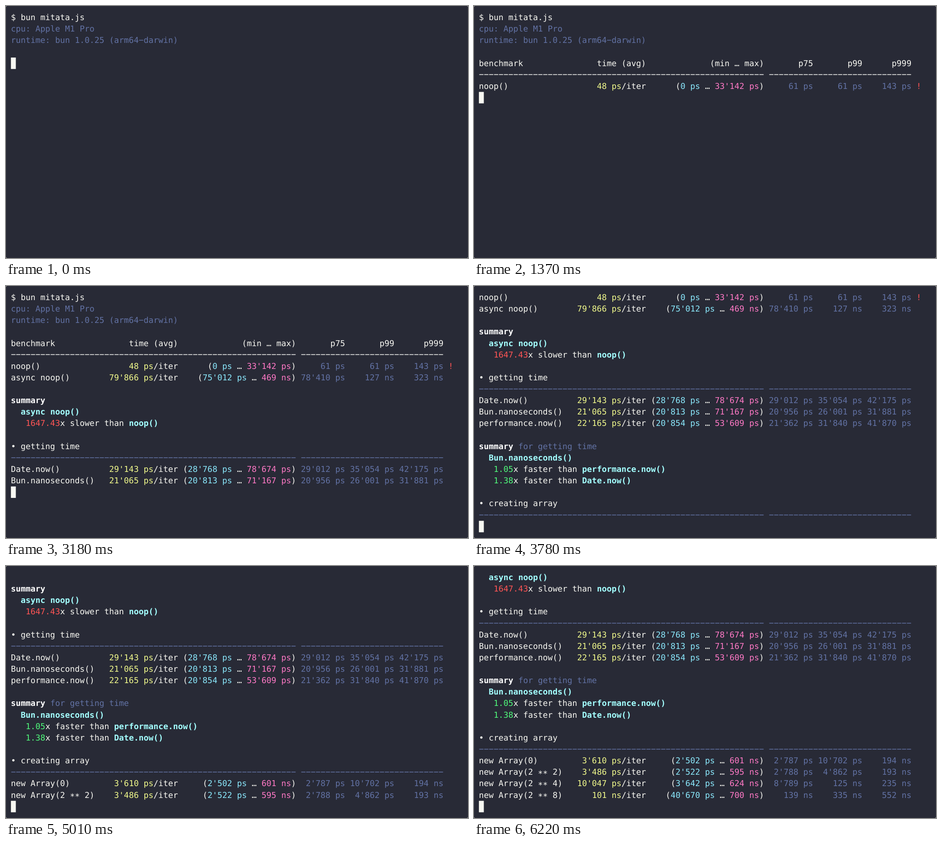
Write an HTML page that moves like this. It is 1012 px wide and 553 px high and loops after 8000 ms.

```html
<!DOCTYPE html>
<html lang="en">
<head>
<meta charset="utf-8">
<title>Benchmark run</title>
<style>
  html, body { margin: 0; width: 100%; height: 100%; overflow: hidden; background: #fff; }
  svg { display: block; width: 1012px; height: 553px; }
  text { font: 17.882px "DejaVu Sans Mono", monospace; text-rendering: geometricPrecision; }
  .fg     { color: #f8f8f2; }
  .dim    { color: #6272a4; }
  .red    { color: #ff5555; }
  .green  { color: #50fa7b; }
  .yellow { color: #f1fa8c; }
  .cyan   { color: #8be9fd; }
  .pink   { color: #ff79c6; }
  .head   { color: #ffffff; font-weight: bold; }
  .name   { color: #a4ffff; font-weight: bold; }
  text { fill: currentColor; }
  path { stroke: currentColor; stroke-width: 1.5; }
</style>
</head>
<body>
<svg viewBox="0 0 1012 553">
  <rect width="1012" height="553" rx="2" fill="#282a36"/>
  <g id="screen"></g>
  <rect id="cursor" fill="#f8f8f2"/>
</svg>
<script>
const COL = 1012 / 94, ROW = 553 / 22, LAST_ROW = 20, LOOP = 8000;
const screenEl = document.getElementById('screen');
const cursor = document.getElementById('cursor');

// A line is a list of [class, text] runs.
const fg = text => [['fg', text]];
const dim = text => [['dim', text]];
const rule = cls => [[cls, '-'.repeat(58) + ' ' + '-'.repeat(29)]];
const best = name => [['name', '  ' + name]];
const compare = (cls, ratio, word, name) =>
  [['fg', '   '], [cls, ratio], ['fg', `x ${word} than `], ['name', name]];

function bench(name, avg, min, max, ...percentiles) {
  return [
    ['fg', name.padEnd(29 - avg.length)], ['yellow', avg],
    ['fg', '/iter' + '('.padStart(20 - min.length - max.length)],
    ['cyan', min], ['fg', ' … '], ['pink', max], ['fg', ')'],
    ['dim', percentiles.map(p => p.padStart(10)).join('')]
  ];
}

const lines = [
  fg('$ bun mitata.js'),
  dim('cpu: Apple M1 Pro'),
  dim('runtime: bun 1.0.25 (arm64-darwin)'),
  [],
  fg('benchmark'.padEnd(24) + 'time (avg)' + '(min … max)'.padStart(24) +
     ['p75', 'p99', 'p999'].map(p => p.padStart(10)).join('')),
  rule('fg'),
  [...bench('noop()', '48 ps', '0 ps', "33'142 ps", '61 ps', '61 ps', '143 ps'), ['red', ' !']],
  bench('async noop()', "79'866 ps", "75'012 ps", '469 ns', "78'410 ps", '127 ns', '323 ns'),
  [],
  [['head', 'summary']],
  best('async noop()'),
  compare('red', '1647.43', 'slower', 'noop()'),
  [],
  fg('• getting time'),
  rule('dim'),
  bench('Date.now()', "29'143 ps", "28'768 ps", "78'674 ps", "29'012 ps", "35'054 ps", "42'175 ps"),
  bench('Bun.nanoseconds()', "21'065 ps", "20'813 ps", "71'167 ps", "20'956 ps", "26'001 ps", "31'881 ps"),
  bench('performance.now()', "22'165 ps", "20'854 ps", "53'609 ps", "21'362 ps", "31'840 ps", "41'870 ps"),
  [],
  [['head', 'summary'], ['dim', ' for getting time']],
  best('Bun.nanoseconds()'),
  compare('green', '1.05', 'faster', 'performance.now()'),
  compare('green', '1.38', 'faster', 'Date.now()'),
  [],
  fg('• creating array'),
  rule('dim'),
  bench('new Array(0)', "3'610 ps", "2'502 ps", '601 ns', "2'787 ps", "10'702 ps", '194 ns'),
  bench('new Array(2 ** 2)', "3'486 ps", "2'522 ps", '595 ns', "2'788 ps", "4'862 ps", '193 ns'),
  bench('new Array(2 ** 4)', "10'047 ps", "3'642 ps", '624 ns', "8'789 ps", '125 ns', '235 ns'),
  bench('new Array(2 ** 8)', '101 ns', "40'670 ps", '700 ns', '139 ns', '335 ns', '552 ns')
];

// [time in ms, lines printed so far]
const steps = [[0, 4], [20, 6], [1370, 7], [1970, 15], [2580, 16], [3180, 17],
  [3780, 26], [4400, 27], [5010, 28], [5620, 29], [6220, 30]];

const rowTop = row => (row + 0.5) * ROW;

// Words sit on the character grid; hyphens are wide strokes, asterisks hang low.
function drawLine(runs, row) {
  const top = rowTop(row);
  let col = 1, out = '';
  for (const [cls, text] of runs) {
    for (const { 0: word, index } of text.matchAll(/-+|\*+|[^\s*-]+/g)) {
      const x = (col + index) * COL;
      if (word[0] === '-') {
        out += `<path class="${cls}" d="M${x + 0.8} ${top + 12.3}h${word.length * COL - 1.6}"
          stroke-dasharray="${COL - 1.6} 1.6"/>`;
      } else {
        const y = top + (word[0] === '*' ? 22.1 : 18.4);
        out += `<text class="${cls}" x="${x}" y="${y}">${word}</text>`;
      }
    }
    col += text.length;
  }
  return out;
}

function render(count) {
  const scroll = Math.max(0, count - LAST_ROW);
  screenEl.innerHTML = lines.slice(scroll, count).map(drawLine).join('');
  cursor.setAttribute('x', COL);
  cursor.setAttribute('y', rowTop(count - scroll));
  cursor.setAttribute('width', COL);
  cursor.setAttribute('height', ROW);
}

let shown = 0;
function tick() {
  const t = performance.now() % LOOP;
  const count = steps.findLast(([start]) => start <= t)[1];
  if (count !== shown) render(shown = count);
  requestAnimationFrame(tick);
}
tick();
</script>
</body>
</html>
```
